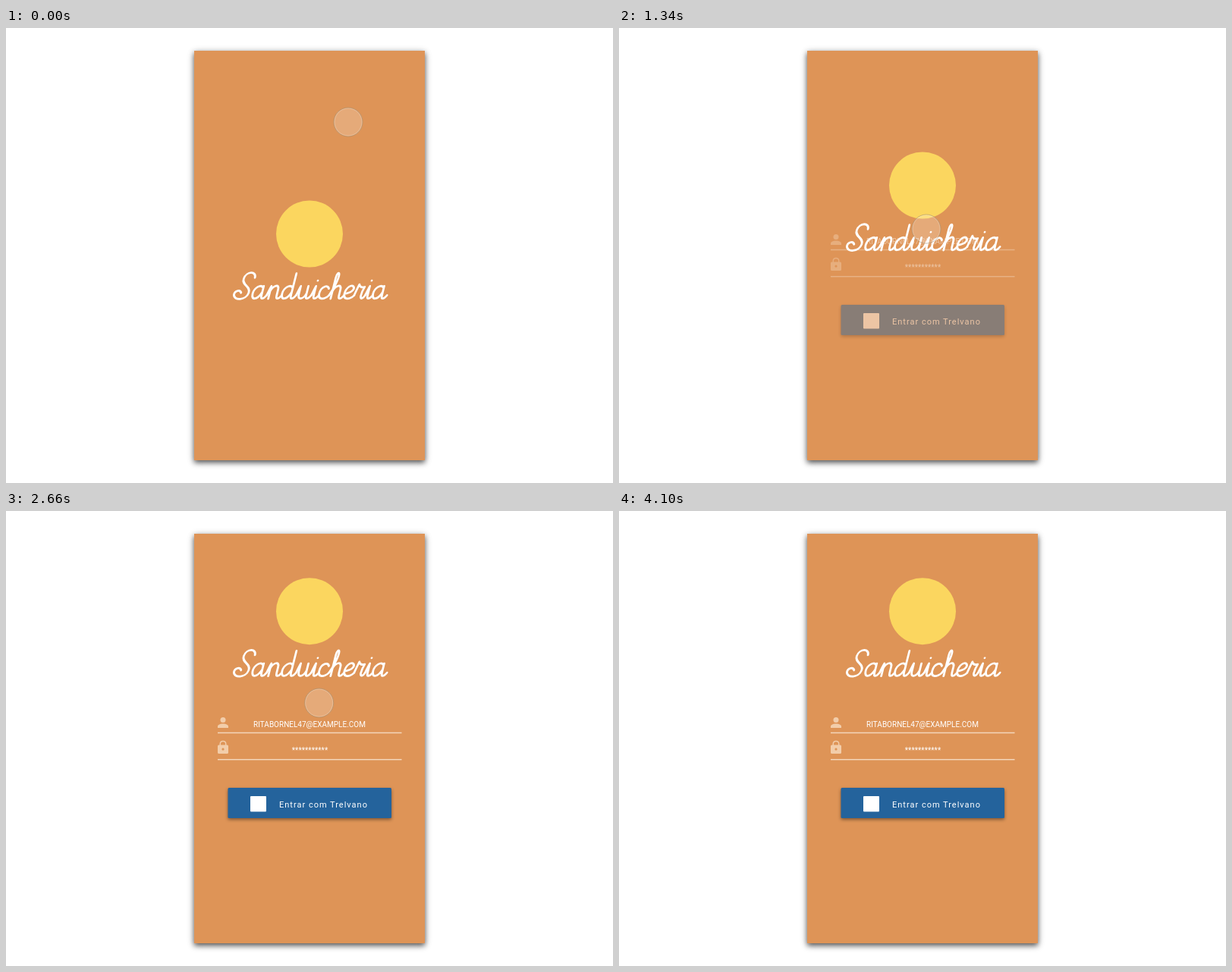
An HTML page for the animation above (4.12 s loop, 800 px wide and 600 px high).

```html
<!DOCTYPE html>
<html lang="pt">
<head>
<meta charset="utf-8">
<title>Login</title>
<style>
  html, body { margin: 0; width: 100%; height: 100%; overflow: hidden; background: #fff; }
  .card {
    position: absolute; left: 248px; top: 30px; width: 304px; height: 540px;
    background: #de9457;
    box-shadow: 0 3px 7px rgba(0, 0, 0, .62), 0 2px 10px rgba(0, 0, 0, .16);
  }
  svg { position: absolute; left: 0; top: 0; display: block; }
  text { font-family: Roboto, Arial, sans-serif; fill: #fff; }
  .mid { font-size: 10px; text-anchor: middle; }
  .label { font-size: 11px; letter-spacing: 1px; }
  .button { fill: #24639c; filter: drop-shadow(0 2px 2px rgba(0, 0, 0, .42)); }
  .icon { fill: #f2cdaa; }
  .rule { stroke: #f3d5ba; stroke-width: 1.6; }
  .script { fill: none; stroke: #fff; stroke-width: 2.5; stroke-linecap: round; stroke-linejoin: round; }
</style>
</head>
<body>
<div class="card"></div>
<svg width="800" height="600" viewBox="0 0 800 600">
  <clipPath id="screen"><rect x="248" y="30" width="304" height="540"/></clipPath>

  <g id="form" opacity="0">
    <g class="icon">
      <circle cx="286" cy="275.5" r="3.5"/>
      <path d="M279 286V284C279 279.2 293 279.2 293 284V286Z"/>
      <path fill-rule="evenodd" d="M280.5 308.5H291.5Q293 308.5 293 310V318.5Q293 320 291.5 320H280.5Q279 320 279 318.5V310Q279 308.5 280.5 308.5ZM286 312.6a1.6 1.6 0 1 0 .01 0Z"/>
      <path d="M282.3 309V306.8a3.7 3.4 0 0 1 7.4 0V309" fill="none" stroke="#f2cdaa" stroke-width="1.5"/>
    </g>
    <text class="mid" x="400" y="285">RITABORNEL47@EXAMPLE.COM</text>
    <text class="mid" x="400.5" y="319">***********</text>
    <path class="rule" d="M279 292.5H521.5M279 327.7H521.5"/>
    <rect class="button" x="292.5" y="365" width="215.5" height="40" rx="1.5"/>
    <rect x="322" y="376" width="21" height="20.5" rx="1" fill="#fff"/>
    <text class="label" x="360" y="391">Entrar com Trelvano</text>
  </g>

  <g id="brand">
    <circle cx="400" cy="271.5" r="44" fill="#fbd65f"/>
    <g id="word" class="script" role="img" aria-label="Sanduicheria"
       transform="translate(299 357) scale(1.11) skewX(-14)"></g>
  </g>

  <g clip-path="url(#screen)">
    <g id="pointer">
      <circle r="19.3" fill="#fff" fill-opacity=".2"/>
      <circle r="19" fill="none" stroke="#96805f" stroke-opacity=".5"/>
      <circle r="18" fill="none" stroke="#fff" stroke-opacity=".22"/>
    </g>
  </g>
</svg>
<script>
  const $ = id => document.getElementById(id);
  const LOOP = 4120;

  // Pen strokes of the script lettering: [advance, path], baseline at y = 0
  const bowl = 'M12 -13C8 -18 1 -13 1 -6C1 2 8 2 12 -8';
  const rise = 'M1 -4C2 -8 3 -12 4 -15';
  const arch = 'M4 -9C6 -16 13 -18 13 -11V-4C13 1 16 1 19 -4';
  const glyphs = {
    S: [21, 'M20 -25C20 -33 8 -33 7 -24C6 -16 18 -15 17 -7C16 2 2 3 0 -5C0 -10 6 -11 8 -7'],
    a: [17, bowl + 'M12 -15V-4C12 1 15 1 18 -4'],
    n: [18, rise + 'V0' + arch],
    d: [17, bowl + 'M12 -30V-4C12 1 15 1 18 -4'],
    u: [18, rise + 'V-5C4 2 11 1 13 -7M13 -15V-4C13 1 16 1 19 -4'],
    i: [9, rise + 'V-4C4 1 7 1 10 -4M4.5 -21.5h.01'],
    c: [12, 'M11 -12C9 -17 1 -15 1 -6C1 2 9 1 13 -4'],
    h: [18, 'M1 -4C5 -12 8 -24 7 -29C6 -32 4 -30 4 -25V0' + arch],
    e: [12, 'M1 -6C9 -7 12 -11 10 -14C7 -18 1 -13 1 -6C1 2 9 1 13 -4'],
    r: [13, 'M1 -4C2 -9 3 -13 4 -17C5 -14 8 -13 11 -14C9 -9 9 -5 9 -3C10 1 12 0 14 -4']
  };
  let pen = 0;
  $('word').innerHTML = [...'Sanduicheria'].map(ch => {
    const [advance, d] = glyphs[ch];
    const part = `<path d="${d}" transform="translate(${pen} 0)"/>`;
    pen += advance;
    return part;
  }).join('');

  // Pointer keys: [ms, x, y]
  const enter = [
    [0, 451, 124], [120, 461, 145], [250, 469, 200], [390, 405, 318], [490, 337, 343],
    [560, 348, 332], [680, 430, 292], [770, 469, 262], [850, 434, 244], [925, 405, 265]
  ];
  const leave = [[2600, 405, 265], [2760, 452, 200], [2880, 553, 87], [2920, 582, 87]];

  const slope = (keys, i, axis) => {
    const a = keys[i - 1], b = keys[i + 1];
    return a && b ? (b[axis] - a[axis]) / (b[0] - a[0]) : 0;
  };

  // Smooth Hermite curve through the keys, at rest on both ends
  function along(keys, t, axis) {
    const last = keys.length - 1;
    if (t <= keys[0][0]) return keys[0][axis];
    if (t >= keys[last][0]) return keys[last][axis];
    const i = keys.findIndex(k => k[0] > t) - 1;
    const [a, b] = [keys[i], keys[i + 1]];
    const span = b[0] - a[0], u = (t - a[0]) / span, v = 1 - u;
    return a[axis] * (1 + 2 * u) * v * v + b[axis] * u * u * (3 - 2 * u)
      + span * (slope(keys, i, axis) * u * v * v - slope(keys, i + 1, axis) * u * u * v);
  }

  function ease(t, start, length) {
    const u = Math.min(1, Math.max(0, (t - start) / length));
    return (1 - Math.cos(Math.PI * u)) / 2;
  }

  function draw(t) {
    const p = ease(t, 1140, 424);
    $('brand').setAttribute('transform', `translate(0 ${-139.3 * p})`);
    $('form').setAttribute('opacity', p);
    const keys = t < 2000 ? enter : leave;
    $('pointer').setAttribute('transform', `translate(${along(keys, t, 1)} ${along(keys, t, 2)})`);
  }

  const begin = performance.now();
  function tick() {
    draw((performance.now() - begin) % LOOP);
    requestAnimationFrame(tick);
  }
  tick();
</script>
</body>
</html>
```
